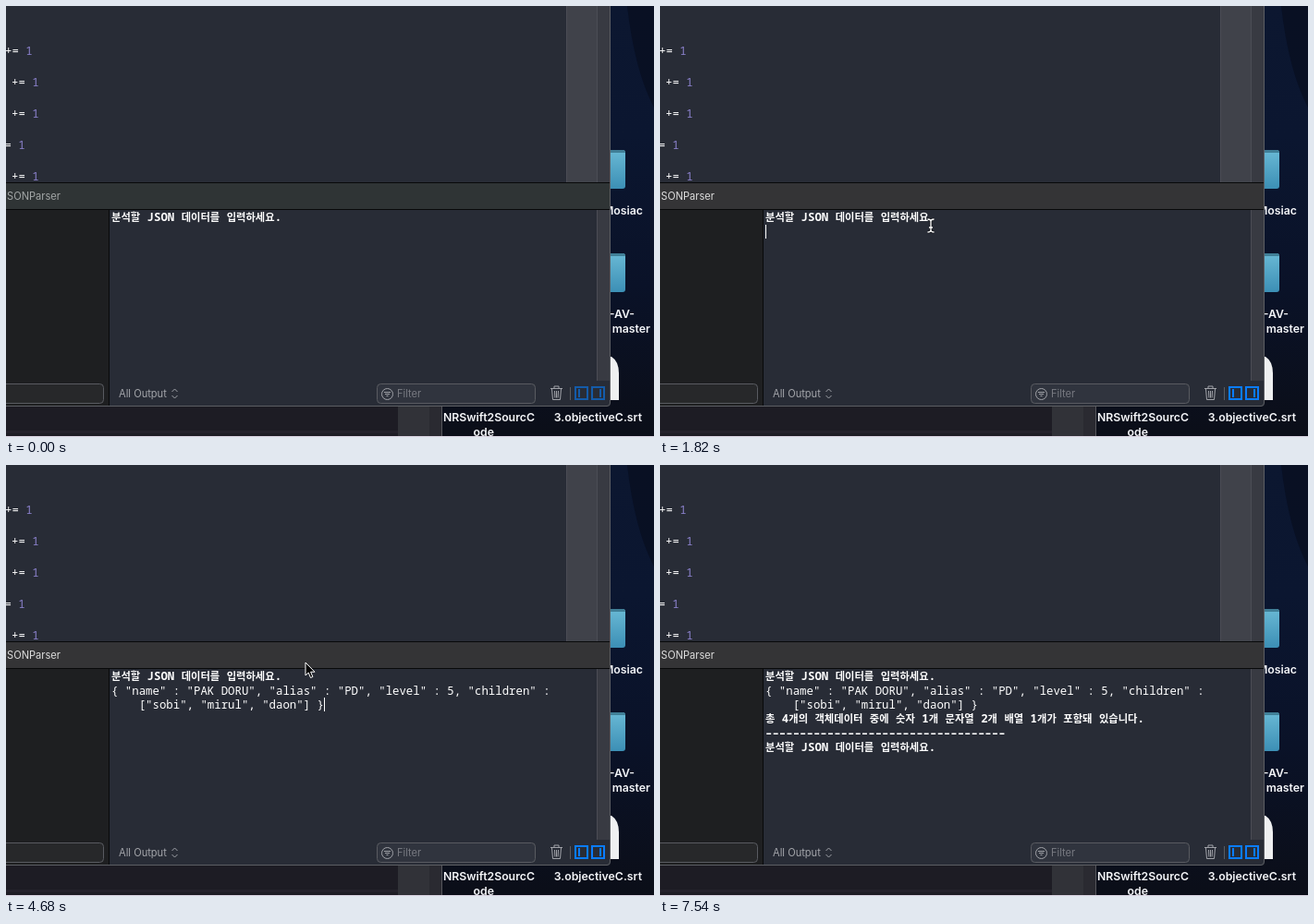
Write an HTML page that moves like this. It is 701x467 px and loops after 7.67 s.

```html
<!DOCTYPE html>
<html lang="ko">
<head>
<meta charset="utf-8">
<style>
html, body { margin: 0; width: 100%; height: 100%; overflow: hidden; background: #0b1122; }
svg { display: block; font-family: Inter, sans-serif; }
text { white-space: pre; }
.label { font-size: 12.3px; font-weight: 600; fill: #f4f5f8; text-anchor: end; }
.ui { font-size: 11.1px; }
.code, .out { font-family: "Noto Sans Mono", monospace; font-size: 12.37px; fill: #fff; }
.code { font-weight: 500; }
.out { font-weight: 700; }
.num { fill: #8b81cc; }
.ko { font-family: "Noto Sans CJK KR", "Noto Sans CJK", sans-serif; font-size: 11.3px; font-weight: 900; }
.line { fill: none; stroke: #a0a2a8; }
#cursors path { stroke-linejoin: round; }
</style>
</head>
<body>
<svg width="701" height="467" viewBox="0 0 701 467">
  <defs>
    <linearGradient id="sky" x2="0" y2="1">
      <stop stop-color="#0c1730"/><stop offset=".3" stop-color="#0b1630"/>
      <stop offset=".65" stop-color="#0a1228"/><stop offset="1" stop-color="#0b0e18"/>
    </linearGradient>
    <linearGradient id="blue" x2="0" y2="1">
      <stop stop-color="#69b9d5"/><stop offset="1" stop-color="#3c8fb5"/>
    </linearGradient>
    <g id="folder">
      <path d="M640 0h27q3 0 3 3v36q0 3-3 3h-27z" fill="url(#blue)"/>
      <path d="M640 0h27q3 0 3 3h-30z" fill="#407f97"/>
    </g>
  </defs>

  <!-- desktop -->
  <rect x="472" width="229" height="467" fill="url(#sky)"/>
  <path d="M672 0q8 70 29 110V0z" fill="#080e1e" opacity=".7"/>
  <use href="#folder" y="156"/>
  <use href="#folder" y="268"/>
  <path d="M640 380h15q8 5 8 18v29h-23z" fill="#eff0f1"/>
  <g class="label">
    <text x="689" y="226">Mosiac</text>
    <text x="680" y="338">-AV-</text>
    <text x="697" y="354">master</text>
    <text x="572" y="450">NRSwift2SourcC</text>
    <text x="528" y="466">ode</text>
    <text x="688" y="450">3.objectiveC.srt</text>
  </g>

  <!-- window behind -->
  <rect y="434" width="472" height="33" fill="#1d1c24"/>
  <path d="M0 460h424v3H0z" fill="#24222b"/>
  <path d="M424 434h34v33h-34z" fill="#313238"/>
  <path d="M458 434h13v33h-13z" fill="#2a2a31"/>
  <path d="M471.5 434v33" stroke="#55565c"/>
  <path d="M0 466.5h701" stroke="#ddd6e4"/>

  <!-- editor window -->
  <path d="M0 0h654v430q0 4-4 4H0z" fill="#282c36"/>
  <path d="M606 0h33v191h-33z" fill="#40424a"/>
  <path d="M639 0h14v191h-14zM639 221h14v185h-14z" fill="#383a42"/>
  <path d="M606.5 0v191M639.5 0v191M639.5 221v185" stroke="#4b4d55"/>
  <g class="code">
    <text x="-1" y="53">+= <tspan class="num">1</tspan></text>
    <text x="6" y="87">+= <tspan class="num">1</tspan></text>
    <text x="6" y="121">+= <tspan class="num">1</tspan></text>
    <text x="-9" y="155">+= <tspan class="num">1</tspan></text>
    <text x="6" y="189">+= <tspan class="num">1</tspan></text>
  </g>
  <rect id="bar" y="191" width="653" height="30"/>
  <text id="title" class="ui" x="59" y="210" text-anchor="end">JSONParser</text>
  <path d="M0 221h111v212H0z" fill="#1e1f21"/>
  <path d="M0 191.5h653M0 220.5h653M111.5 221v212" stroke="#08090a"/>
  <path d="M653.5 0v430q0 3.5-3.5 3.5H0" fill="none" stroke="#5c5e63"/>

  <!-- console footer -->
  <g fill="#fff" fill-opacity=".04" stroke="#595b61">
    <rect x="-9.5" y="409.5" width="115" height="21" rx="4"/>
    <rect x="401.5" y="409.5" width="171" height="21" rx="4"/>
    <path d="M610.5 413v14"/>
  </g>
  <text class="ui" x="122" y="424" fill="#a4a6ab">All Output</text>
  <text class="ui" x="423" y="424" fill="#777980">Filter</text>
  <path class="line" d="M179.5 418l3-3 3 3M179.5 422l3 3 3-3"/>
  <g class="line">
    <circle cx="412.5" cy="420.5" r="6"/>
    <path d="M409 418.5h7M410 420.5h5M411.5 422.5h2"/>
    <path d="M589 414.5h13M593 414v-2h5v2M590.5 415l1 11.5h8l1-11.5M593.5 417l.4 7.5M595.5 417v7.5M597.5 417l-.4 7.5"/>
  </g>
  <g id="panes" fill="none" stroke-width="2">
    <path d="M616 413h13v13h-13zM620 415v9"/>
    <path d="M634 413h13v13h-13zM643 415v9"/>
  </g>

  <text class="out" x="114" y="233">분석할 JSON 데이터를 입력하세요.</text>
  <g id="input" class="code">
    <text x="114" y="249">{ "name" : "PAK DORU", "alias" : "PD", "level" : 5, "children" :</text>
    <text x="143.7" y="264">["sobi", "mirul", "daon"] }</text>
  </g>
  <g id="result">
    <text class="out" x="114" y="279">총 4개의 객체데이터 중에 숫자 1개 문자열 2개 배열 1개가 포함돼 있습니다.</text>
    <text class="out" x="114" y="295">–––––––––––––––––––––––––––––––––––</text>
    <text class="out" x="114" y="310">분석할 JSON 데이터를 입력하세요.</text>
  </g>
  <rect id="caret" width="1" height="15" fill="#fff"/>

  <g id="cursors">
    <g id="beam" fill="none">
      <path d="M-3.5-7Q0-7 0-4.5Q0-7 3.5-7M0-5V5M-3.5 7Q0 7 0 4.5Q0 7 3.5 7M-2 2h4" stroke="#15171c" stroke-width="3"/>
      <path d="M-3.5-7Q0-7 0-4.5Q0-7 3.5-7M0-5V5M-3.5 7Q0 7 0 4.5Q0 7 3.5 7M-2 2h4" stroke="#fff" stroke-width="1.3"/>
    </g>
    <path id="arrow" d="M0 0v14l3.2-3 2.3 5.5 2.4-1-2.3-5.3h4.4z" fill="#050505" stroke="#fff"/>
    <path id="resize" d="M0-7.5L3.5-4H1v3h6v2H1v3h2.5L0 7.5-3.5 4H-1V1h-6v-2h6v-3h-2.5z" fill="#050505" stroke="#fff" stroke-width="1.6" paint-order="stroke"/>
  </g>
</svg>
<script>
const LOOP = 7670, STEP = 130, BLINK = 560;
const ACTIVATE = 1040, FOCUS = 1690, PASTE = 4290, ENTER = 5590;
// time, x, y of the pointer
const path = [
  [1300, 300, 475], [1560, 293, 238], [2730, 293, 238], [3900, 316, 229], [4290, 318, 226],
  [4680, 324, 214], [5590, 350, 215], [6110, 353, 215], [6500, 400, 490]
];
const $ = id => document.getElementById(id);
const show = (id, on) => $(id).style.display = on ? "" : "none";

document.querySelectorAll(".out").forEach(line => {
  line.innerHTML = line.textContent.replace(/[가-힣]+/g, '<tspan class="ko">$&</tspan>');
});

function pointerAt(t) {
  const i = path.findIndex(key => key[0] > t);
  if (i < 1) return null;
  const [t0, x0, y0] = path[i - 1], [t1, x1, y1] = path[i];
  const k = (t - t0) / (t1 - t0);
  return [x0 + (x1 - x0) * k, y0 + (y1 - y0) * k];
}

function drawPointer(t) {
  const pos = pointerAt(t);
  show("cursors", pos);
  if (!pos) return;
  const [x, y] = pos;
  const kind = y > 221 && y < 406 ? "beam" : y < 221 && x > 340 ? "resize" : "arrow";
  for (const id of ["beam", "arrow", "resize"]) show(id, id === kind);
  $("cursors").setAttribute("transform", `translate(${x} ${y})`);
}

function drawCaret(t) {
  const [since, x, y] = t >= ENTER ? [ENTER, 114, 314] : t >= PASTE ? [PASTE, 344, 252] : [FOCUS, 114, 237];
  show("caret", t >= FOCUS && Math.floor((t - since) / BLINK) % 2 === 0);
  $("caret").setAttribute("x", x);
  $("caret").setAttribute("y", y);
}

function draw() {
  const t = Math.floor(performance.now() % LOOP / STEP) * STEP;
  const active = t >= ACTIVATE;
  $("bar").setAttribute("fill", active ? "#343436" : "#2f3435");
  $("title").setAttribute("fill", active ? "#dedede" : "#a3a7a7");
  $("panes").setAttribute("stroke", active ? "#0a7cff" : "#145ba9");
  show("input", t >= PASTE);
  show("result", t >= ENTER);
  drawCaret(t);
  drawPointer(t);
  requestAnimationFrame(draw);
}
draw();
</script>
</body>
</html>
```
